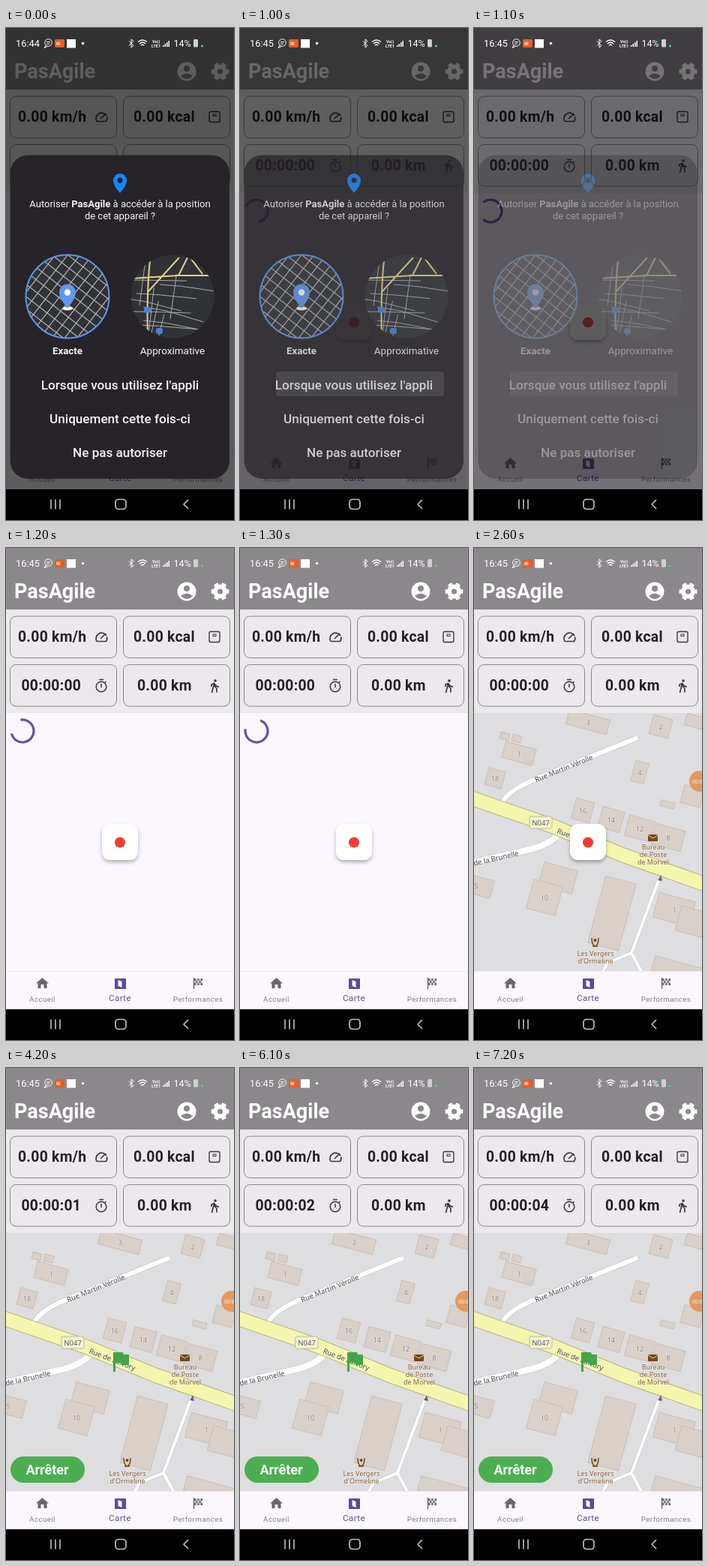
Recreate the animation shown at these times as an HTML page. Size 304 px wide and 656 px high, loop 8 s.

```html
<!DOCTYPE html>
<html lang="fr">
<head>
<meta charset="utf-8">
<style>
html, body { margin: 0; width: 100%; height: 100%; overflow: hidden; background: #000; }
svg { display: block; width: 304px; height: 656px; font-family: Roboto, sans-serif; }
.mid { text-anchor: middle; }
.end { text-anchor: end; }
.bold { font-weight: 700; }
.medium { font-weight: 500; }
.value { font-weight: 600; letter-spacing: .3px; }
.tab { letter-spacing: .4px; }
.map { font-family: "Noto Sans", sans-serif; paint-order: stroke; stroke: #fff8; stroke-width: 1.2px; }
</style>
</head>
<body>
<svg id="stage" viewBox="0 0 304 656"></svg>
<script>
const text = (x, y, size, str, fill, cls = "", more = "") =>
  `<text x="${x}" y="${y}" font-size="${size}" fill="${fill}" class="${cls}" ${more}>${str}</text>`;
const mid = (x, y, size, str, fill, cls = "") => text(x, y, size, str, fill, "mid " + cls);
const tilted = (x, y, angle, str, cls) =>
  text(0, 0, 9.5, str, "#444", "map " + cls, `transform="translate(${x} ${y}) rotate(${angle})"`);
const line = (d, color, width, more = "") =>
  `<path d="${d}" fill="none" stroke-linejoin="round" stroke="${color}" stroke-width="${width}" ${more}/>`;
const rect = (x, y, w, h, fill, r = 0, more = "") =>
  `<rect x="${x}" y="${y}" width="${w}" height="${h}" rx="${r}" fill="${fill}" ${more}/>`;
const dot = (x, y, r, fill, more = "") => `<circle cx="${x}" cy="${y}" r="${r}" fill="${fill}" ${more}/>`;
const ring = (x, y, r, color, width, more = "") => dot(x, y, r, "none", `stroke="${color}" stroke-width="${width}" ${more}`);
const group = (id, content) => `<g id="${id}">${content}</g>`;
const repeat = (n, make) => Array.from({ length: n }, (_, i) => make(i)).join("");

// Drop shape whose head has radius r around (x, y)
const pin = (x, y, r, fill, hole) =>
  `<path d="M${x} ${y + r * 1.9}Q${x - r} ${y + r * .8} ${x - r} ${y}a${r} ${r} 0 0 1 ${2 * r} 0Q${x + r} ${y + r * .8} ${x} ${y + r * 1.9}z" fill="${fill}"/>` +
  dot(x, y, r * .38, hole);

function seeded(seed) {
  return () => (seed = seed * 16807 % 2147483647) / 2147483647;
}

function cityMap() {
  const house = (x, y, w, h) =>
    rect(x - w / 2, y - h / 2, w, h, "#d9d0ca", 0, `stroke="#c8beb7" transform="rotate(15 ${x} ${y})"`);
  const number = (x, y, n) => mid(x, y + 4, 9, n, "#828082", "map");
  const numbered = (x, y, w, h, n) => house(x, y, w, h) + number(x, y, n);
  const row = repeat(4, i => house(145 + 38 * i, 350 + 12 * i, 25 + 5 * i, 28)) +
    [16, 14, 12, 8].map((n, i) => number(145 + 38 * i, 350 + 12 * i, n)).join("");
  const street = (d, w) => line(d, "#cccacc", w + 1.5) + line(d, "#fff", w);
  const place = (x, y, words) => words.map((s, i) => mid(x, y + i * 10, 9, s, "#80592f", "map")).join("");
  const main = "M-5 333L105 371 200 410 310 449";
  const brown = "#734a12";
  return rect(0, 220, 304, 344, "#dedde0") +
    repeat(2, i => house(41 + 16 * i, 251 + 3 * i, 12, 9)) + row +
    numbered(60, 274, 42, 22, 1) + numbered(28, 307, 23, 23, 18) + numbered(152, 232, 56, 20, 3) +
    numbered(249, 238, 26, 26, 2) + numbered(221, 299, 18, 28, 4) + numbered(3, 450, 44, 24, 5) +
    house(112, 440, 46, 32) + numbered(94, 466, 40, 40, 10) + house(184, 487, 42, 92) +
    numbered(267, 482, 50, 34, 1) + house(290, 498, 36, 34) + house(294, 231, 24, 16) +
    house(291, 331, 27, 24) + house(258, 342, 19, 8) + house(275, 563, 74, 20) +
    street("M248 438L210 540 224 566M210 540L178 553 171 566", 4) +
    street("M36 342Q44 324 80 309L218 253", 6) +
    street("M-5 420L70 403Q102 396 114 380", 8) +
    line(main, "#a5a672", 20) + line(main, "#f4f6ad", 18.4) +
    `<path d="M249 436l-4 7 6 1z" fill="#666"/>` +
    rect(74, 358, 30, 16, "#f3f3cf", 2, 'stroke="#bab99a"') + mid(89, 370, 9.5, "N047", "#555", "map") +
    tilted(121, 297, -22, "Rue Martin Vérolle", "mid") +
    tilted(60, 410, -13, "Rue de la Brunelle", "end") +
    tilted(110, 380, 21, "Rue de Falvory", "") +
    rect(232, 382, 13, 9, brown, 1) + line("M232 383l6.5 4 6.5-4", "#e6dccf", 1) +
    place(239, 402, ["Bureau", "de Poste", "de Morvel"]) +
    dot(161.5, 523, 2, brown) + line("M157 520q0 10 4.500 11 4.500-1 4.500-11M158 531h7", brown, 1.5) +
    place(162, 544, ["Les Vergers", "d'Ormeline"]);
}

function header() {
  const grey = "#8b888b", ink = "#3b393d";
  const card = i => rect(5.5 + i % 2 * 151, 91 + (i >> 1) * 64.5, 142, 55.5, "#ebe9ec", 8, `stroke="${grey}"`);
  const value = (x, y, s, more) => text(x, y, 19.3, s, "#222024", "value", more);
  const gauge = line("M121 124.500a7.500 7.500 0 1 1 13-7.500M121 124.500h12.500q2-3 1.200-6M126 121l7-7", ink, 1.7);
  const scale = rect(271, 111.5, 14, 14, "none", 2, `stroke="${ink}" stroke-width="1.4"`) +
    rect(276, 115, 4, 2.5, "none", 0, `stroke="${ink}"`);
  const timer = ring(127, 185, 6.8, ink, 1.5) + line("M124 175.500h6M127 181v5M132 179.500l1.500-1.500", ink, 1.5);
  const walker = dot(279, 177, 1.800, ink) +
    line("M274 185v-3l3.500-1.500 1 4 2.500 3v5M277.500 181l-3 12M278 181q2 4 6 4", ink, 1.700);
  return rect(0, 0, 304, 82, grey) + rect(0, 82, 304, 138, "#ebe9ec") +
    text(11, 67, 27, "PasAgile", "#fff", "bold") +
    dot(241, 58, 12.5, "#fff") + dot(241, 54, 4, grey) + `<path d="M233 64q8-7 16 0-8 8-16 0z" fill="${grey}"/>` +
    ring(285.5, 58, 6.5, "#fff", 6) +
    ring(285.5, 58, 10.2, "#fff", 3.500, 'pathLength="12" stroke-dasharray="1.1 .9" stroke-dashoffset=".55"') +
    repeat(4, card) + value(16, 125, "0.00 km/h") + value(170, 125, "0.00 kcal") +
    value(20.5, 190, "00:00:00", 'id="clock"') + value(175, 190, "0.00 km") + gauge + scale + timer + walker;
}

function tabs() {
  const ink = "#69666c", purple = "#594a9b";
  const home = `<path d="M48.500 573l8.500 7.500h-2.500v6.500h-4v-5h-4v5h-4v-6.500H40z" fill="${ink}"/>`;
  const folded = rect(145, 574, 15, 14, purple, 1) + `<path d="M149.500 576l5 2v8l-5-2z" fill="#fcf7ff"/>`;
  const checks = line("M250.500 573v15", ink, 1.4) + repeat(15, i =>
    rect(251 + i % 5 * 2.2, 574 + (i / 5 | 0) * 3, 2.2, 3, i % 2 ? "#d0ccd3" : ink));
  return rect(0, 564, 304, 51, "#fcf7ff") + line("M0 564.500H304", "#eee9f1", 1) + home + folded + checks +
    mid(48.5, 605, 9.8, "Accueil", "#827f85", "tab") + mid(152, 604, 11.5, "Carte", purple, "tab") +
    mid(256, 605, 9.8, "Performances", "#827f85", "tab");
}

function dialog() {
  const white = "#f3f2f5", night = "#303236", blue = "#5b95ea";
  const rand = seeded(11);
  const disc = (id, x, content) =>
    `<clipPath id="${id}"><circle cx="${x}" cy="358" r="55.500"/></clipPath>` +
    `<g clip-path="url(#${id})">${rect(x - 56, 302, 112, 112, night)}${content}</g>`;
  const grid = repeat(16, i => {
    const k = -56 + i * 13;
    return line(`M${k - 56} -90V90M-90 ${k - 40}H90`, "#b5b4b8", 1.2, 'transform="translate(82 358) rotate(38)"');
  });
  const lanes = repeat(13, i => {
    const x = 166 + rand() * 80, y = 330 + i * 6, drop = rand() * 18;
    return line(i % 3 ? `M${x - 30} ${y}l30 ${drop / 3} 50 ${drop}` : `M${x + 20} ${y - 20}l-${drop} 60`, "#aaa9ad", 1);
  });
  const avenues = line("M193 300Q187 350 189 414M166 334l64-4 14-28M189 352l42-46M225 330h55M244 304l18 24", "#e3d08f", 2);
  const shields = repeat(2, i => rect(184 + 16 * i, 372 + 28 * i, 9, 8, "#4386d8", 3));
  const choices = ["Lorsque vous utilisez l'appli", "Uniquement cette fois-ci", "Ne pas autoriser"];
  return rect(5.5, 169.5, 292.5, 431.5, "#262428", 24) + pin(152, 203, 9, "#1685fb", "#262428") +
    mid(152, 239, 13, 'Autoriser <tspan class="bold">PasAgile</tspan> à accéder à la position', white) +
    mid(152, 255, 13, "de cet appareil ?", white) +
    disc("exact", 82, grid) + ring(82, 358, 55.5, blue, 2) +
    `<ellipse cx="82" cy="374" rx="7" ry="2.500" fill="#fff"/>` + pin(82, 352.5, 11, "#5f96ee", "#fff") +
    disc("rough", 222, lanes + avenues + shields) +
    mid(82, 435, 13.3, "Exacte", white, "bold") + mid(222, 435, 13.5, "Approximative", white) +
    rect(48, 458, 224, 33, "#fff", 4, 'id="ripple"') +
    choices.map((s, i) => mid(152, 482 + 45 * i, 17.1, s, white, "medium")).join("");
}

function statusBar() {
  const w = "#fff";
  return text(13, 25, 12.8, "16:44", w, "", 'id="hour"') +
    ring(56.5, 19.5, 4.8, w, 1) + line("M53 23l-2 3.500 4-1.800M54 18.500h5M54 21h4", w, 1) +
    rect(65, 15, 13, 11, "#ed5b22", 2) + rect(67, 18.5, 5.5, 4.5, "#f8b394", 1) +
    rect(81, 15, 12, 11.5, w) + dot(102.5, 20.5, 1.8, w) +
    line("M164 17.500l6 6-3 2.500V15l3 2.500-6 6", w, 1) +
    repeat(3, i => line(`M${176 + 2 * i} ${18.5 + 2.5 * i}q${6 - 2 * i} ${i - 5} ${12 - 4 * i} 0`, w, 1.3)) +
    text(195, 19.5, 5.5, "Vo))", w, "bold") + text(194, 25.5, 5.5, "LTE1", w, "bold") +
    repeat(4, i => rect(209 + i * 2.5, 23 - i * 2, 1.5, 2 + i * 2, w)) +
    text(223.5, 25, 12.5, "14%", w) + rect(250, 15, 6, 10.5, "#d2d0d2", 1.5) + dot(261.5, 24, 1.5, "#55d96a");
}

function systemBar() {
  const ink = "#c2c2c2";
  return rect(0, 615, 304, 41, "#000") + repeat(3, i => line(`M${60 + 6 * i} 628.500v13`, ink, 1.6)) +
    rect(146, 628.5, 14, 13, "none", 4, `stroke="${ink}" stroke-width="1.700"`) + line("M243 629l-6 6 6 6", ink, 1.7);
}

const recordKey = rect(128, 368, 48, 48, "#fff", 11, 'id="key" filter="url(#shadow)"') + dot(152, 392.5, 7, "#f43b31");
const runMarks = `<path d="M143 379h13l.6 3H164v14h-10l-.6-3H146v12h-3z" fill="#43a548"/>` +
  rect(6, 518, 99, 35, "#4bae50", 17.5) + mid(55, 542, 18, "Arrêter", "#fff", "bold");

document.getElementById("stage").innerHTML =
  `<filter id="shadow" x="-30%" y="-30%" width="160%" height="170%">
    <feDropShadow dx="0" dy="3" stdDeviation="2.5" flood-opacity=".3"/></filter>` +
  rect(0, 220, 304, 344, "#fcf7ff", 0, 'id="page"') + ring(22, 244, 15, "#6252a5", 3.2, 'id="spinner"') +
  group("map", cityMap()) + group("record", recordKey) + group("run", runMarks) + header() + tabs() +
  group("bubble", dot(301, 311, 14, "#e29a61") + text(291, 314, 7, "00:0", "#fff0e0")) +
  rect(0, 0, 304, 615, "#000", 0, 'id="dim"') + group("dialog", dialog()) + statusBar() + systemBar();

const $ = id => document.getElementById(id);
const show = (id, opacity) => $(id).setAttribute("opacity", +opacity);
const clamp = v => Math.max(0, Math.min(1, v));

function draw(t) {
  const fade = clamp((1170 - t) / 230);
  show("dialog", fade);
  show("dim", t < 1200 ? .5 + .13 * fade : 0);
  show("ripple", .12 * clamp((t - 600) / 300));
  $("hour").textContent = t < 1000 ? "16:44" : "16:45";

  const sweep = 155 + 110 * Math.cos((t - 1200) / 1800 * 2 * Math.PI);
  $("spinner").setAttribute("stroke-dasharray", `${sweep * Math.PI / 12} 100`);
  $("spinner").setAttribute("transform", `rotate(${-100 + (t - 1200) * .3} 22 244)`);
  show("spinner", t < 1500);
  $("page").setAttribute("fill", t < 1500 ? "#fcf7ff" : "#dfdee0");
  show("map", t < 1700 ? 0 : clamp(.45 + (t - 1700) / 400));
  show("bubble", t >= 1500);

  $("key").setAttribute("fill", t === 3000 ? "#e9e6ea" : "#fff");
  show("record", t < 3100);
  show("run", t >= 3100);
  $("clock").textContent = "00:00:0" + Math.max(0, Math.floor((t - 3200) / 1000));
}

// The screen advances ten times a second
const start = performance.now();
function tick() {
  draw(Math.floor((performance.now() - start) % 8000 / 100) * 100);
  requestAnimationFrame(tick);
}
tick();
</script>
</body>
</html>
```
